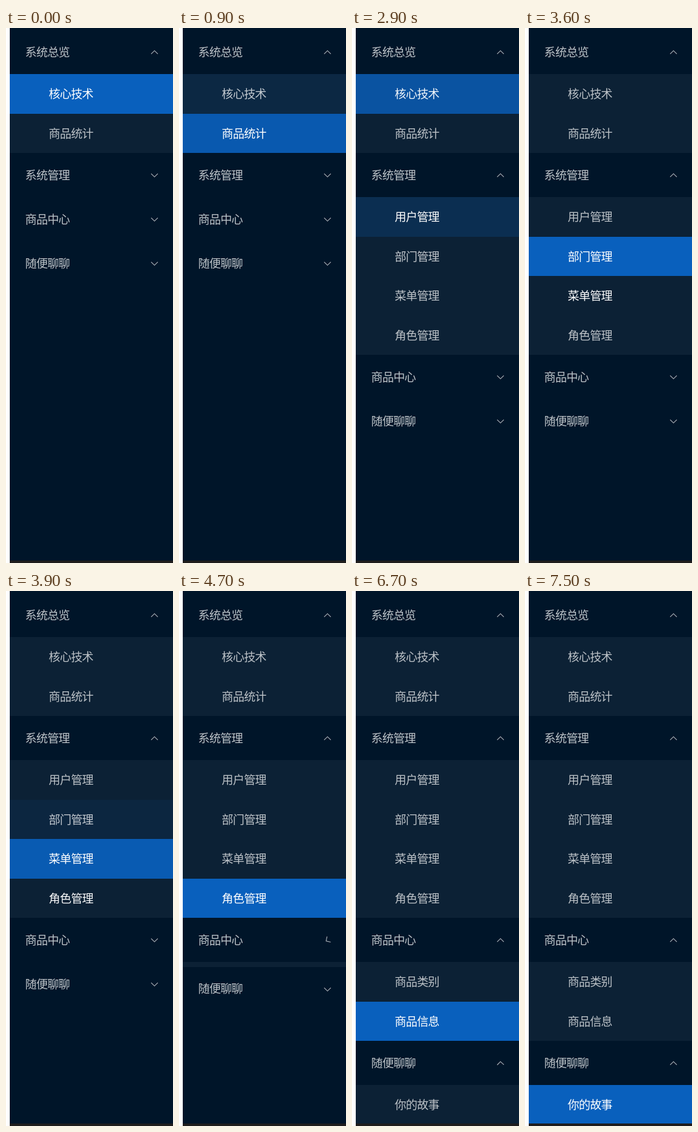
Animation, 266 px wide and 848 px high, one loop 8400 ms. Source, as an HTML page with a canvas:

```html
<!DOCTYPE html>
<html lang="zh-CN">
<head>
<meta charset="utf-8">
<title>侧边菜单</title>
<style>
html, body { margin: 0; width: 100%; height: 100%; overflow: hidden; background: #fff; }
canvas { display: block; width: 266px; height: 848px; }
</style>
</head>
<body>
<canvas id="stage"></canvas>
<script>
const W = 266, H = 848, LEFT = 6, BOTTOM = 844;
const LOOP = 8400, STEP = 100, FADE = 300;
const TITLE_H = 70, ITEM_H = 62.5;
const ALWAYS = -1000;

const canvas = document.getElementById('stage');
const ctx = canvas.getContext('2d', { alpha: false });
const ratio = window.devicePixelRatio || 1;
canvas.width = W * ratio;
canvas.height = H * ratio;

// select and bright hold alternating on/off times in ms
const item = (text, select, bright) => ({ text, select, bright });
const menu = [
  { title: '系统总览', open: ALWAYS, items: [
    item('核心技术', [ALWAYS, 715, 1412, 2852], [ALWAYS, 715, 1150, 2852]),
    item('商品统计', [715, 1412], [202, 1412])
  ] },
  { title: '系统管理', open: 2245, items: [
    item('用户管理', [2852, 3308], [2505, 3308]),
    item('部门管理', [3308, 3702], [2880, 3702]),
    item('菜单管理', [3702, 4115], [3380, 4115]),
    item('角色管理', [4115, 5202], [3704, 5202])
  ] },
  { title: '商品中心', open: 4637, items: [
    item('商品类别', [5202, 5502], [4760, 5502]),
    item('商品信息', [5502, 7208], [5204, 7208])
  ] },
  { title: '随便聊聊', open: 6437, items: [
    item('你的故事', [7208], [6902])
  ] }
];

function bezier(x1, y1, x2, y2) {
  const at = (a, b, u) => 3 * a * u * (1 - u) ** 2 + 3 * b * u * u * (1 - u) + u ** 3;
  return x => {
    if (x <= 0) return 0;
    if (x >= 1) return 1;
    let lo = 0, hi = 1;
    for (let i = 0; i < 24; i++) {
      const mid = (lo + hi) / 2;
      if (at(x1, x2, mid) < x) lo = mid; else hi = mid;
    }
    return at(y1, y2, lo);
  };
}
const ease = bezier(0.25, 0.1, 0.25, 1);
const easeInOut = bezier(0.645, 0.045, 0.355, 1);

function level(times, t) {
  const n = times.filter(at => at <= t).length;
  if (!n) return 0;
  const p = ease((t - times[n - 1]) / FADE);
  return n % 2 ? p : 1 - p;
}

function mix(a, b, p) {
  return 'rgb(' + a.map((v, i) => Math.round(v + (b[i] - v) * p)).join(',') + ')';
}

function band(top, bottom, color) {
  const y = Math.round(top);
  ctx.fillStyle = color;
  ctx.fillRect(LEFT, y, W - LEFT, Math.round(bottom) - y);
}

function label(text, x, middle, alpha) {
  ctx.fillStyle = `rgba(255,255,255,${alpha})`;
  ctx.fillText(text, x, Math.round(middle + 6.9));
}

function arrow(middle, turn) {
  ctx.save();
  ctx.translate(236.5, Math.round(middle) + 0.5);
  ctx.rotate(turn * Math.PI);
  ctx.beginPath();
  ctx.moveTo(-5.3, -2.6);
  ctx.lineTo(0, 2.6);
  ctx.lineTo(5.3, -2.6);
  ctx.stroke();
  ctx.restore();
}

function drawItems(group, top, height, t) {
  ctx.save();
  ctx.beginPath();
  ctx.rect(LEFT, Math.round(top), W - LEFT, Math.round(top + height) - Math.round(top));
  ctx.clip();
  group.items.forEach((it, i) => {
    const y = top + i * ITEM_H;
    band(y, y + ITEM_H, mix([12, 33, 53], [9, 96, 189], level(it.select, t)));
    label(it.text, 68, y + ITEM_H / 2, 0.72 + 0.28 * level(it.bright, t));
  });
  ctx.restore();
}

function draw(t) {
  ctx.setTransform(ratio, 0, 0, ratio, 0, 0);
  ctx.fillStyle = '#fff';
  ctx.fillRect(0, 0, W, H);
  band(0, H, '#001529');
  ctx.font = '18.5px "Noto Sans CJK SC", "Noto Sans CJK", "Noto Sans CJK JP", sans-serif';
  ctx.letterSpacing = '-0.8px';
  ctx.textBaseline = 'alphabetic';
  ctx.strokeStyle = 'rgba(255,255,255,0.68)';
  ctx.lineWidth = 1.1;

  let y = 3;
  for (const group of menu) {
    const p = (t - group.open) / FADE;
    label(group.title, 30.5, y + TITLE_H / 2, 0.74);
    arrow(y + TITLE_H / 2, ease(p));
    y += TITLE_H;
    const height = group.items.length * ITEM_H * easeInOut(p);
    if (height > 0) drawItems(group, y, height, t);
    y += height;
  }
  band(BOTTOM, H, '#1f1d1d');
}

const start = performance.now();
function frame() {
  const t = (performance.now() - start) % LOOP;
  draw(Math.floor(t / STEP) * STEP);
  requestAnimationFrame(frame);
}
frame();
</script>
</body>
</html>
```
